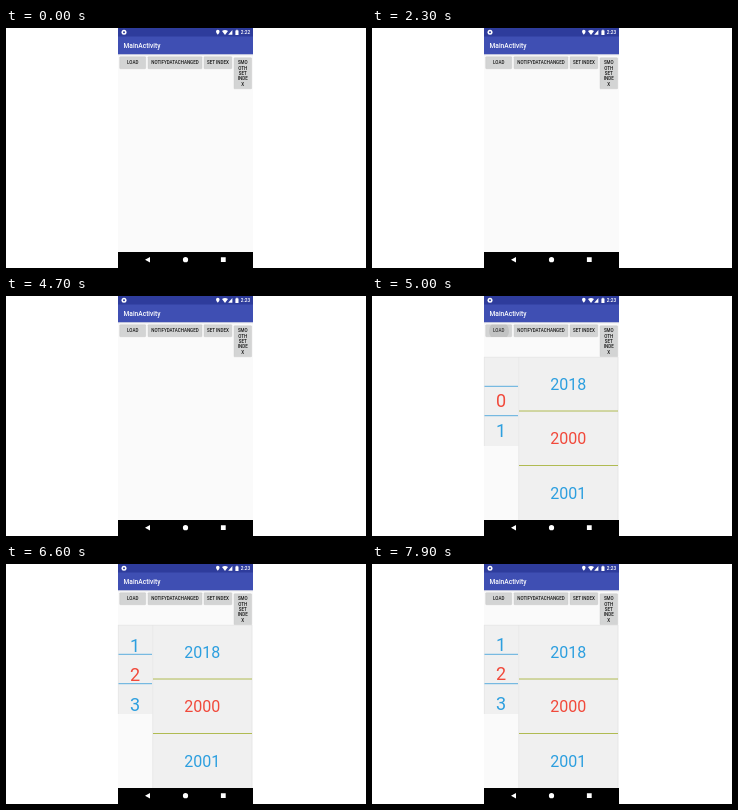
Write an HTML page that moves like this. It is 360 by 240 pixels and loops after 8000 ms.

```html
<!DOCTYPE html>
<html lang="en">
<head>
<meta charset="utf-8">
<title>Wheel picker</title>
<style>
html, body { margin: 0; width: 100%; height: 100%; overflow: hidden; background: #fff; }
svg { display: block; width: 100%; height: 100%; font-family: Roboto, sans-serif; }
.btn { font-size: 4.5px; font-weight: 500; text-anchor: middle; fill: #161616; }
.num { text-anchor: middle; fill: #2d9fdf; }
.num.on { fill: #f1493b; }
</style>
</head>
<body>
<svg id="stage" viewBox="0 0 360 240">
  <defs>
    <clipPath id="leftClip"><path d="M112 61h34.5v89H112z"/></clipPath>
    <clipPath id="loadClip"><path d="M113.5 28.5h26.5v12.5h-26.5z"/></clipPath>
  </defs>
  <path fill="#fafafa" d="M112 27h135v197H112z"/>
  <path fill="#3f4fb3" d="M112 8h135v18.5H112z"/>
  <path fill="#2e3c9c" d="M112 0h135v8.5H112z"/>
  <path fill="#dedee2" d="M112 26.5h135v.8H112z"/>
  <text x="117.6" y="20" font-size="6.6" font-weight="500" fill="#fff">MainActivity</text>

  <g fill="#fff">
    <circle cx="118" cy="4.2" r="2.5"/>
    <circle cx="118" cy="4.2" r="1" fill="#2e3c9c"/>
    <path d="M211.8 1.7a1.8 1.8 0 0 1 1.8 1.8q0 1.2-1.8 3.3q-1.8-2.1-1.8-3.3a1.8 1.8 0 0 1 1.8-1.8z"/>
    <path d="M216 3q3-2 6 0l-3 3.9z"/>
    <path d="M226.4 2v4.8h-4.2z"/>
    <path d="M229.4 2.4h.9v-.6h1.3v.6h.9v4.5h-3.1z"/>
    <text id="clock" x="234.8" y="6.2" font-size="4.8" font-weight="500"></text>
  </g>

  <g id="buttons"></g>
  <circle id="ripple" cx="127" cy="35" fill="#888" clip-path="url(#loadClip)"/>

  <g id="wheels">
    <path fill="#f0f0f0" d="M112 61h34.5v89H112zM147 61h99v163h-99z"/>
    <path fill="none" stroke="#dfdfdf" stroke-width=".5" d="M112.3 61v89M146.6 61v163M246 61v163M112 61.2h134"/>
    <g id="left" clip-path="url(#leftClip)" font-size="18"></g>
    <path stroke="#5badde" d="M112.5 90.3h33.5M112.5 119.7h33.5"/>
    <g id="right" font-size="16"></g>
    <path stroke="#b0bb52" d="M147 115h99M147 169.5h99"/>
  </g>

  <path d="M112 224h135v16H112z"/>
  <path fill="#fff" d="M144 229v5.4l-5-2.7zM214.9 229.3h4.8v4.8h-4.8z"/>
  <circle cx="179.5" cy="231.7" r="2.6" fill="#fff"/>
</svg>
<script>
const LOOP = 8000, STEP = 100, ROW = 29.6;
const $ = id => document.getElementById(id);

function add(parent, tag, attrs, text = '') {
  const el = document.createElementNS('http://www.w3.org/2000/svg', tag);
  for (const key in attrs) el.setAttribute(key, attrs[key]);
  el.textContent = text;
  parent.append(el);
  return el;
}

function button(x, y, w, h, lines) {
  add($('buttons'), 'rect', { x, y, width: w, height: h, rx: .6, fill: '#d3d4d4', stroke: '#c5c6c6', 'stroke-width': .4 });
  const top = y + h / 2 - (lines.length - 1) * 2.7 + 1.6;
  lines.forEach((line, i) =>
    add($('buttons'), 'text', { class: 'btn', x: x + w / 2, y: top + i * 5.4 }, line));
}

button(113.7, 28.7, 26, 12, ['LOAD']);
button(142, 28.7, 54, 12, ['NOTIFYDATACHANGED']);
button(198, 28.7, 27.8, 12, ['SET INDEX']);
button(228, 29.8, 17.6, 31, ['SMO', 'OTH', 'SET', 'INDE', 'X']);

const digits = Array.from({ length: 6 }, (_, i) => add($('left'), 'text', { x: 129, class: 'num' }, i));
[2018, 2000, 2001].forEach((year, i) =>
  add($('right'), 'text', { x: 196.3, y: 93.9 + i * 54.3, class: i === 1 ? 'num on' : 'num' }, year));

// Wheel position in rows: [time, row]
const scroll = [[6300, 0], [6400, .45], [6500, 1.25], [6600, 1.8], [6800, 1.9], [7000, 1.9], [7300, 1.83]];

function track(keys, t) {
  if (t <= keys[0][0]) return keys[0][1];
  for (let i = 1; i < keys.length; i++) {
    const [t0, a] = keys[i - 1], [t1, b] = keys[i];
    if (t < t1) return a + (b - a) * (t - t0) / (t1 - t0);
  }
  return keys[keys.length - 1][1];
}

function draw(time) {
  const t = Math.floor(time % LOOP / STEP) * STEP;
  $('clock').textContent = t < 600 ? '2:22' : '2:23';

  const press = (t - 4700) / 700;
  const active = press > 0 && press < 1;
  $('ripple').setAttribute('r', active ? 4 + 14 * press : 0);
  $('ripple').setAttribute('opacity', active ? .4 * (1 - press) : 0);
  $('wheels').setAttribute('visibility', t < 5000 ? 'hidden' : 'visible');

  const row = track(scroll, t);
  digits.forEach((el, i) => {
    el.setAttribute('y', 111.4 + (i - row) * ROW);
    el.setAttribute('class', i === Math.round(row) ? 'num on' : 'num');
  });
}

const start = performance.now();
function tick() {
  draw(performance.now() - start);
  requestAnimationFrame(tick);
}
tick();
</script>
</body>
</html>
```
